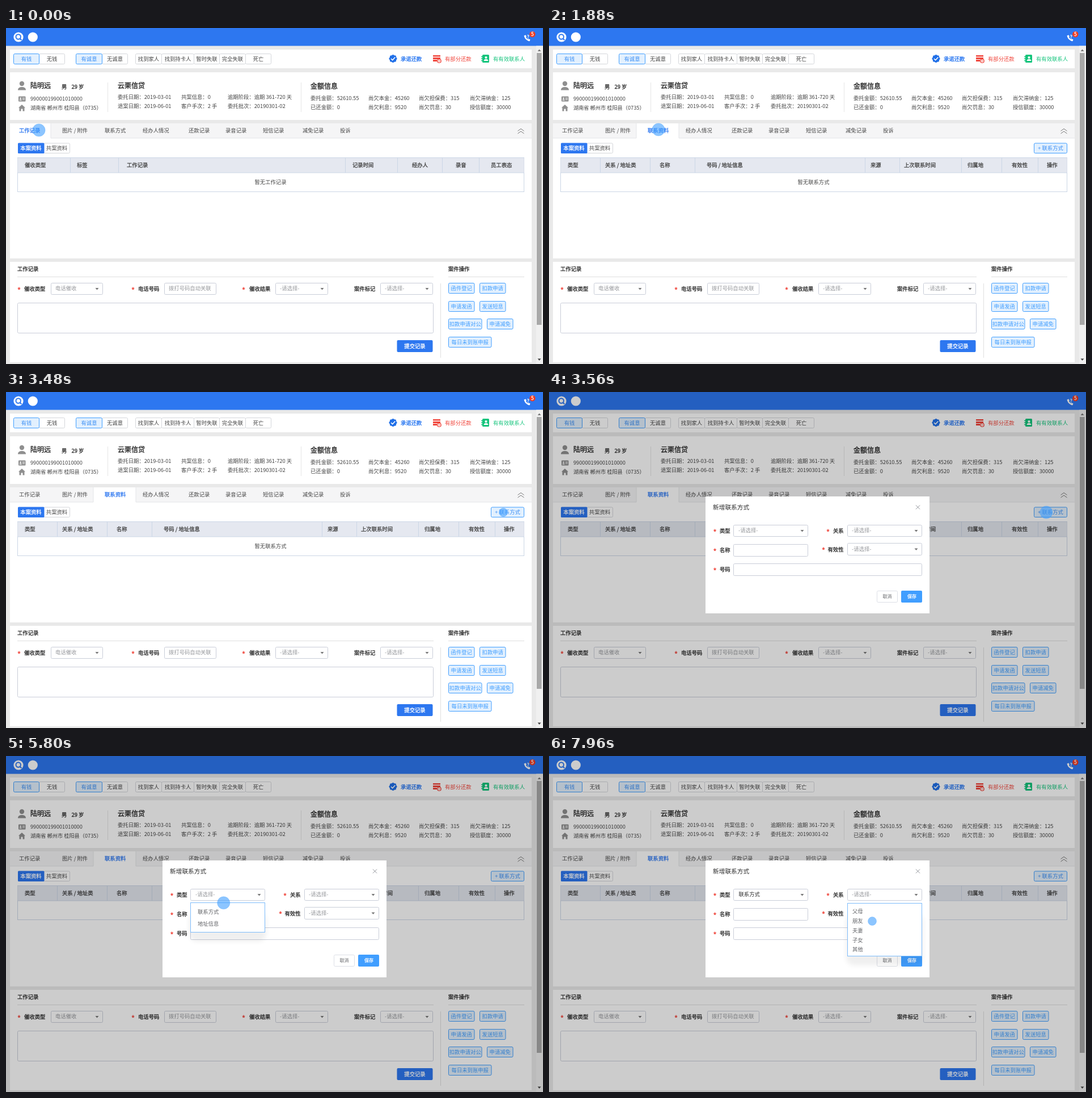
Write an HTML page that moves like this. It is 947x592 px and loops after 8000 ms.

```html
<!DOCTYPE html>
<html lang="zh-CN">
<head>
<meta charset="utf-8">
<title>案件工作台</title>
<style>
  html, body { margin: 0; width: 100%; height: 100%; overflow: hidden; background: #e9e9e9; }
  svg { display: block; width: 947px; height: 592px; }
  text { font-family: "Noto Sans CJK SC", "Noto Sans CJK", "Noto Sans", sans-serif; white-space: pre; }
</style>
</head>
<body>
<svg id="stage" viewBox="0 0 947 592" xmlns="http://www.w3.org/2000/svg"></svg>
<script>
const BLUE = '#2d77f0', SKY = '#409eff', PALE = '#e2f0fe', INK = '#444', DARK = '#2b2b2b', HINT = '#96989c', RED = '#f0443a';

// Drawing helpers; text takes its vertical centre. Medium weight is a thin outline over regular.
const text = (x, y, s, o = {}) => {
  const size = o.size || 9.33, fill = o.fill || INK;
  const weight = o.medium ? `stroke="${fill}" stroke-width="${size * .032}"` : `font-weight="${o.weight || 400}"`;
  return `<text x="${x}" y="${(y + size * 0.37).toFixed(2)}" font-size="${size}" fill="${fill}" ${weight}` +
    ` text-anchor="${o.anchor || 'start'}">${s}</text>`;
};
const mid = (x, y, s, o = {}) => text(x, y, s, { ...o, anchor: 'middle' });
const rect = (x, y, x2, y2, fill, extra = '') =>
  `<rect x="${x}" y="${y}" width="${x2 - x}" height="${y2 - y}" fill="${fill}" ${extra}/>`;
const box = (x, y, x2, y2, fill, stroke, r = 1.5) =>
  rect(x + .5, y + .5, x2 - .5, y2 - .5, fill, `stroke="${stroke}" rx="${r}"`);
const line = (x, y, x2, y2, c) => `<path d="M${x} ${y}L${x2} ${y2}" stroke="${c}" fill="none"/>`;
const path = (d, fill, extra = '') => `<path d="${d}" fill="${fill}" ${extra}/>`;
const circle = (x, y, r, fill, extra = '') => `<circle cx="${x}" cy="${y}" r="${r}" fill="${fill}" ${extra}/>`;
const group = (id, body) => `<g id="${id}">${body}</g>`;

const button = (x, y, x2, y2, s, fill, stroke, ink) =>
  box(x, y, x2, y2, fill, stroke, 2) + mid((x + x2) / 2, (y + y2) / 2, s, { fill: ink });
const caret = (x, y) => path(`M${x - 3} ${y - 1.6}h6l-3 3.6z`, '#777');
const field = (x, y, x2, y2, s = '', arrow = false) =>
  box(x, y, x2, y2, '#fff', '#c9cdd8', 2) + text(x + 8, (y + y2) / 2 - .5, s, { fill: HINT }) +
  (arrow ? caret(x2 - 10.5, (y + y2) / 2) : '');
const star = (x, y) => text(x, y + 2, '*', { fill: RED, size: 13, medium: true });
const label = (x, y, s, starX) =>
  (starX ? star(starX, y) : '') + text(x, y, s, { fill: DARK, medium: true });

function topBar() {
  return rect(0, 0, 947, 31.5, BLUE) +
    circle(22, 16, 8.6, '#fff') + circle(21.7, 15.5, 4.2, 'none', `stroke="${BLUE}" stroke-width="2"`) +
    path('M24.500 18.500l2.800 2.800', 'none', `stroke="${BLUE}" stroke-width="2.200"`) +
    circle(47.3, 16, 8.6, '#fff') +
    path('M915.500 13.500c-.8 3.500 3.500 8.500 7.800 8.300', 'none', 'stroke="#fff" stroke-width="2.400"') +
    path('M914.800 13l1.700 3M920.800 20.500l3 1.600', 'none', 'stroke="#fff" stroke-width="3.400"') +
    text(918.500, 15.500, '?', { fill: '#fff', size: 8.5, weight: 700 }) +
    circle(928.3, 11, 5.2, '#f23a1f') + mid(928.3, 11, '5', { fill: '#fff', size: 8.5, medium: true });
}

function filters() {
  const items = [[13, 59, '有钱', 1], [59, 104, '无钱'], [123, 170, '有诚意', 1], [170, 215, '无诚意'],
    [229, 275, '找到家人'], [275, 332, '找到持卡人'], [332, 377, '暂时失联'], [377, 423, '完全失联'], [423, 468, '死亡']];
  const draw = ([x, x2, s, on]) => on
    ? button(x, 45, x2, 64, s, PALE, SKY, '#3b8ff5') : button(x - 1, 45, x2, 64, s, '#fff', '#d4d6da', INK);
  const sorted = items.filter(i => !i[3]).concat(items.filter(i => i[3]));
  const badge = Array.from({ length: 16 }, (_, i) => {
    const a = i * Math.PI / 8, r = i % 2 ? 6.2 : 7.3;
    return (682.5 + r * Math.cos(a)).toFixed(1) + ' ' + (54 + r * Math.sin(a)).toFixed(1);
  }).join('L');
  return rect(7, 38, 927, 71, '#fff') + sorted.map(draw).join('') +
    path(`M${badge}z`, '#2170e8') + path('M679 54l2.600 2.600 4.700-5', 'none', 'stroke="#fff" stroke-width="1.5"') +
    text(696, 54.500, '承诺还款', { fill: '#2675f0', medium: true }) +
    rect(753, 48, 766, 50.5, RED) + rect(753, 52, 766, 55, RED) + path('M753 56h7v3h-7z', RED) +
    circle(764, 58, 3.2, '#fff', `stroke="${RED}" stroke-width="1.3"`) + path('M762.500 58h3', 'none', `stroke="${RED}"`) +
    text(774, 54.500, '有部分还款', { fill: RED }) +
    rect(840, 47, 852, 61, '#14c47c', 'rx="1.500"') + circle(846.5, 52, 2.1, '#fff') +
    path('M842.500 58c.3-4.500 7.700-4.500 8 0z', '#fff') +
    path('M838 50.500h4M838 54h4M838 57.500h4', 'none', 'stroke="#14c47c" stroke-width="1.300"') +
    text(859, 54.500, '有有效联系人', { fill: '#14c47c' });
}

function profile() {
  const grey = '#8f8f8f', div = '#e6e6e6';
  const facts = [
    [197, 122, '委托日期：2019-03-01', '退案日期：2019-06-01'],
    [309, 122, '共案信息：0', '客户手次：2 手'],
    [391, 122, '逾期阶段：逾期 361-720 天', '委托批次：20190301-02'],
    [537, 123.5, '委托金额：52610.55', '已还金额：0'],
    [639, 123.5, '尚欠本金：45260', '尚欠利息：9520'],
    [728, 123.5, '尚欠担保费：315', '尚欠罚息：30'],
    [818, 123.5, '尚欠滞纳金：125', '授信额度：30000']];
  const head = { size: 12, fill: DARK, medium: true };
  const note = { fill: DARK, medium: true };
  return rect(7, 78, 927, 162, '#fff') +
    circle(28, 98, 4.2, grey) + path('M21 109.500c0-4 3-5.500 7-5.500s7 1.500 7 5.500z', grey) +
    rect(22, 120.500, 34.500, 129.5, grey, 'rx="1"') + circle(25.600, 123.700, 1.3, '#fff') +
    path('M23.500 127.500c.3-2.700 4-2.700 4.300 0zM29 123h4v1h-4zM29 125.500h4v1h-4z', '#fff') +
    path('M28 135l6 5.500h-1.500v6h-3v-4h-3v4h-3v-6H22z', grey) +
    text(43, 102, '陆明远', head) + text(98, 103.500, '男', note) + text(115.500, 103.500, '29 岁', note) +
    text(43, 125, '990000199001010000', { size: 9.2 }) + text(43, 141, '湖南省 郴州市 桂阳县（0735）', { size: 9.2 }) +
    text(197, 101.500, '云栗信贷', head) + text(537, 103, '金额信息', head) +
    line(179.5, 96, 179.5, 148, div) + line(520.5, 96, 520.5, 148, div) +
    facts.map(([x, y, a, b]) => text(x, y, a) + text(x, y + 16, b)).join('');
}

const TABS = [[23, '工作记录'], [99, '图片 / 附件'], [174, '联系方式'], [241, '经办人情况'], [322, '还款记录'],
  [387, '录音记录'], [453, '短信记录'], [523, '减免记录'], [589, '投诉']];

function tabs(active, x, x2, name) {
  return rect(7, 168, 927, 194, '#f5f5f6') + line(7, 194, 927, 194, '#e4e5e8') +
    rect(x, 168, x2, 195, '#fff') + (x > 7 ? line(x, 168, x, 194, '#e4e5e8') : '') + line(x2, 168, x2, 194, '#e4e5e8') +
    TABS.map(([tx, s], i) => i === active
      ? text(tx, 181, name, { fill: BLUE, medium: true }) : text(tx, 181, s)).join('');
}

function table(cols, heads, empty) {
  const edge = '#cbd6e6';
  return box(20, 228, 914, 289, '#fff', edge, 0) + rect(20.5, 228.5, 913.5, 255, '#e5e8f0') +
    line(20, 255, 914, 255, edge) + line(20, 228.500, 914, 228.500, edge) +
    cols.map(x => line(x + .5, 228, x + .5, 255, edge)).join('') +
    heads.map(([x, s]) => text(x, 241.500, s, { medium: true })).join('') +
    mid(466.500, 272, empty);
}

function records() {
  return tabs(0, 7, 79, '工作记录') +
    table([113, 198, 598, 690, 769, 834],
      [[33, '催收类型'], [125, '标签'], [213, '工作记录'], [611, '记录时间'], [716, '经办人'], [793, '录音'], [855, '员工表态']],
      '暂无工作记录');
}

function contacts() {
  return tabs(2, 154, 229, '联系资料') +
    table([90, 178, 257, 557, 618, 727, 798, 862],
      [[33, '类型'], [99, '关系 / 地址类'], [195, '名称'], [278, '号码 / 地址信息'], [567, '来源'],
        [626, '上次联系时间'], [738, '归属地'], [816, '有效性'], [878, '操作']], '暂无联系方式') +
    button(855, 202.5, 914, 221, '+ 联系方式', PALE, SKY, '#3b8ff5');
}

function workForm() {
  const rule = '#dfdfdf';
  const ops = [[780, 826, 449, '函件登记'], [835, 881, 449, '扣款申请'], [780, 826, 481, '申请发函'], [835, 881, 481, '发送短息'],
    [780, 839, 512, '扣款申请对公'], [848, 894, 512, '申请减免'], [780, 856, 544, '每日未到账申报']];
  return rect(7, 412, 927, 589, '#fff') +
    label(20, 425, '工作记录') + line(20, 438.500, 754, 438.500, rule) +
    label(780, 425, '案件操作') + line(780, 438.500, 914, 438.500, rule) + line(766.5, 450, 766.5, 581, rule) +
    label(32, 460, '催收类型', 20) + field(79, 449, 171, 470, '电话催收', true) +
    label(233, 460, '电话号码', 221) + field(279, 449, 371, 470, '拨打号码自动关联') +
    label(429, 460, '催收结果', 416) + field(475, 449, 568, 470, '-请选择-', true) +
    label(614, 460, '案件标记') + field(660, 449, 753, 470, '-请选择-', true) +
    box(20, 484, 754, 538, '#fff', '#c9cdd8', 2) +
    rect(689.5, 550, 752.5, 571, BLUE, 'rx="2"') + mid(721, 560.500, '提交记录', { fill: '#fff', medium: true }) +
    ops.map(([x, x2, y, s]) => button(x, y, x2 + .5, y + 19, s, PALE, SKY, SKY)).join('');
}

function scrollBar() {
  return rect(935, 31.5, 947, 592, '#f0f0f0') + rect(936, 44, 944.5, 523, '#a8a8a8') +
    path('M937.500 41l3-3.500 3 3.500z', '#777') + path('M937.500 582.500h6l-3 3.500z', '#444');
}

function modal() {
  return rect(0, 0, 947, 592, '#000', 'opacity=".2"') + rect(276, 184, 671, 390, '#fff') +
    text(289, 203.500, '新增联系方式', { size: 10.7, fill: DARK }) +
    path('M647 199.500l7 7M654 199.500l-7 7', 'none', 'stroke="#909399"') +
    label(301, 245, '类型', 289.500) + field(325, 234, 457, 255, '', true) +
    group('hint', text(334, 244, '-请选择-', { fill: HINT })) +
    group('picked', text(334.500, 244, '联系方式', { fill: DARK })) +
    label(501, 245, '关系', 489) + field(526, 234, 658, 255, '-请选择-', true) +
    label(301, 279, '名称', 289.500) + field(325, 268, 457, 290) +
    label(491.500, 277.500, '有效性', 481) + field(526, 266, 658, 288, '-请选择-', true) +
    label(301, 313, '号码', 289.500) + field(325, 302, 658, 324) +
    box(578, 350, 615, 371, '#fff', '#dcdfe6', 2) + mid(596.500, 360.500, '取消', { size: 8, fill: '#606266' }) +
    rect(621, 350, 658, 371, SKY, 'rx="2"') + mid(640, 360.500, '保存', { size: 8, fill: '#fff', medium: true });
}

function menu(x, y, x2, y2, textX, rows) {
  return rect(x - 2, y + 18, x2 + 2, y2 + 16, '#000', 'rx="14" opacity=".06" filter="url(#soft)"') +
    box(x, y, x2, y2, '#fff', '#7dbcfb', 0) +
    rows.map(([ry, s]) => text(textX, ry, s, { fill: '#606266' })).join('');
}

document.getElementById('stage').innerHTML =
  '<defs><filter id="soft" x="-20%" y="-30%" width="140%" height="160%"><feGaussianBlur stdDeviation="4"/></filter></defs>' +
  rect(0, 0, 947, 592, '#e9e9e9') + topBar() + scrollBar() + filters() + profile() + rect(7, 168, 927, 406, '#fff') +
  group('records', records()) + group('contacts', contacts()) +
  path('M902.500 181.500l5.500-4 5.500 4M902.500 186l5.500-4 5.500 4', 'none', 'stroke="#777"') +
  button(66, 202.5, 113, 221, '共案资料', '#fff', '#d4d6da', INK) +
  rect(21, 202.5, 67.5, 221, BLUE, 'rx="1.500"') + mid(44, 212, '本案资料', { fill: '#fff', medium: true }) +
  workForm() + group('modal', modal()) +
  group('types', menu(325, 258, 457, 311, 338, [[274.5, '联系方式'], [295.5, '地址信息']])) +
  group('relations', menu(526, 259, 658, 353, 535,
    [[274, '父母'], [291, '朋友'], [308, '夫妻'], [324.5, '子女'], [341, '其他']])) +
  circle(0, 0, 11, SKY, `id="cursor" fill-opacity=".6" stroke="${SKY}" stroke-opacity=".3"`);

const LOOP = 8000, STEP = 80, OFFSET = 40, R = 11.1, PRESSED = 7.5;

// When each layer shows: [id, from, to]
const LAYERS = [['records', 0, 1880], ['contacts', 1880, LOOP], ['modal', 3560, LOOP], ['hint', 3560, 6440],
  ['picked', 6440, LOOP], ['types', 5160, 6440], ['relations', 7240, LOOP]];

// Pointer stops: [x, y, leave, arrive, release]; it presses for three steps before each release.
const STOPS = [[193, 179, 920, 1560, 1880], [877, 212, 2280, 3240, 3560], [378, 243.5, 4040, 4840, 5160],
  [389.5, 274, 5480, 6120, 6440], [579, 245, 6440, 6920, 7240], [570, 291, 7240, 7720, 8040]];

const el = id => document.getElementById(id);
const cursor = el('cursor');
const layers = LAYERS.map(([id, from, to]) => ({ node: el(id), from, to }));

function pointer(t) {
  let x = 58, y = 180, r = R;
  for (const [nx, ny, leave, arrive, release] of STOPS) {
    if (t <= leave) break;
    const k = Math.min(1, (t - leave) / (arrive - leave));
    x += (nx - x) * k;
    y += (ny - y) * k;
    r = t > arrive && t < release ? R + (PRESSED - R) * (t - arrive) / (release - STEP - arrive) : R;
  }
  return [x, y, r];
}

function draw(now) {
  const raw = now % LOOP;
  const t = Math.max(0, Math.floor((raw - OFFSET) / STEP) * STEP + OFFSET);
  for (const { node, from, to } of layers) node.style.display = t >= from && t < to ? '' : 'none';
  const [x, y, r] = pointer(t);
  cursor.setAttribute('cx', x);
  cursor.setAttribute('cy', y);
  cursor.setAttribute('r', r);
}

const start = performance.now();
function tick() {
  draw(performance.now() - start);
  requestAnimationFrame(tick);
}
tick();
</script>
</body>
</html>
```
